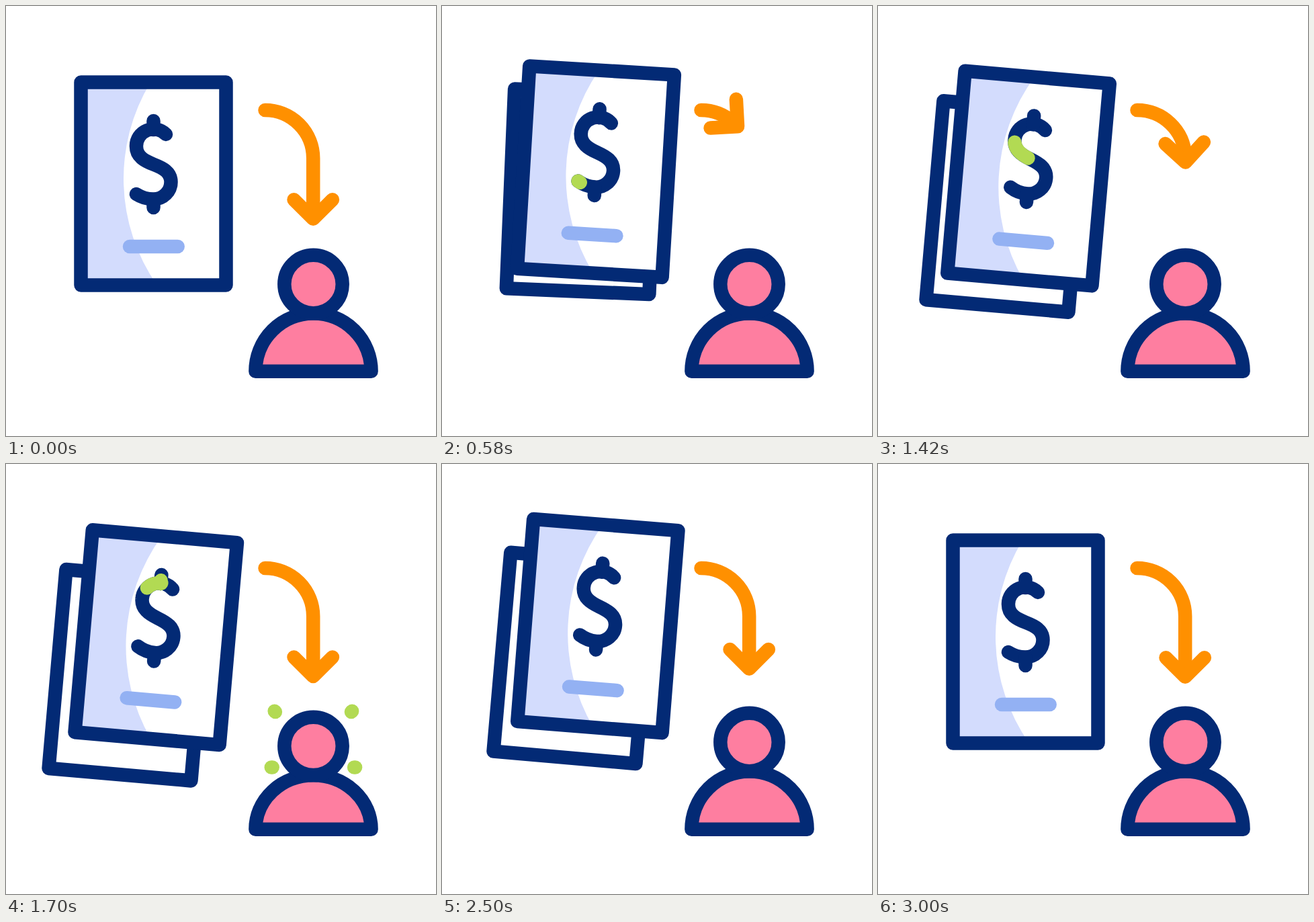
An HTML page for the animation above (3320 ms loop, 640x640 px).

```html
<!DOCTYPE html>
<html lang="en">
<head>
<meta charset="utf-8">
<title>Payment sent to a person</title>
<style>
  html, body { margin: 0; width: 100%; height: 100%; overflow: hidden; background: #fff; }
  svg { display: block; width: 100vw; height: 100vh; }
  .line { fill: none; stroke-width: 20.5; stroke-linecap: round; stroke-linejoin: round; }
  .navy { stroke: #032a75; }
  .white { fill: #fff; }
  .pink { fill: #fe7ea0; }
  .orange { stroke: #ff9000; }
  .blue { stroke: #93b1f3; }
  .green { stroke: #b2da53; }
</style>
</head>
<body>
<svg viewBox="0 0 640 640">
  <defs>
    <path id="ess" d="M194 280C201 284.500 210 287.500 219.500 287.500A26 25.500 0 0 0 245.500 262C245.500 247 233.400 241.100 219.700 235.800S194 224 194 209A25.500 25 0 0 1 238 191"/>
  </defs>

  <g id="back">
    <rect class="line navy white" x="-106.350" y="-148.500" width="212.700" height="297"/>
  </g>

  <g id="front">
    <g transform="translate(-219.500 -264.500)">
      <path class="white" d="M111.500 113.500h216v302h-216z"/>
      <path fill="#d3dcfd" d="M111.500 113.500H215.100A277 277 0 0 0 224.800 415.500H111.500z"/>
      <path class="line navy" d="M111.500 113.500h216v302h-216z"/>
      <path class="line blue" d="M184 358H255.700"/>
      <use href="#ess" class="line navy"/>
      <path class="line navy" d="M219.500 184V171M219.500 288V300"/>
      <path id="glow" class="line green" pathLength="1"/>
      <path id="lowTick" class="line green" pathLength="1" d="M219.500 288V300"/>
      <path id="topTick" class="line green" pathLength="1" d="M219.500 184V171"/>
    </g>
  </g>

  <g id="sparks"></g>

  <path id="body" class="line navy pink"/>
  <circle id="head" class="line navy pink" cx="457.500" r="43.200"/>

  <path id="shaft" class="line orange"/>
  <path id="tip" class="line orange" d="M-19.700 -28.700L9 0L-19.700 28.700" transform-origin="0 0"/>
</svg>

<script>
const LOOP = 3320;
const el = id => document.getElementById(id);
const set = (node, name, value) => node.setAttribute(name, value);

// Eased value at time t from a flat list: time, value, time, value...
function ease(t, keys) {
  if (t <= keys[0]) return keys[1];
  for (let i = 2; i < keys.length; i += 2) {
    if (t < keys[i]) {
      const s = (t - keys[i - 2]) / (keys[i] - keys[i - 2]);
      return keys[i - 1] + (keys[i + 1] - keys[i - 1]) * s * s * (3 - 2 * s);
    }
  }
  return keys[keys.length - 1];
}

// Shows only the stretch of a path its two moving ends enclose.
function trim(node, t, lead, tail) {
  const b = ease(t, [lead[0], 0, lead[1], 1]);
  const a = ease(t, [tail[0], 0, tail[1], 1]);
  node.style.display = b - a > 0.002 ? "" : "none";
  set(node, "stroke-dasharray", `${b - a} 3`);
  set(node, "stroke-dashoffset", -a);
}

set(el("glow"), "d", el("ess").getAttribute("d"));

const MID = 457.4;
const sparks = [];
for (const side of [-1, 1]) {
  for (const [dx, y, ex, ey] of [[56.1, 369.5, 23.5, -23.5], [60.1, 451.5, 37, 0]]) {
    const p = document.createElementNS("http://www.w3.org/2000/svg", "path");
    set(p, "class", "line green");
    set(p, "pathLength", 1);
    set(p, "d", `M${MID + side * dx} ${y}l${side * ex} ${ey}`);
    el("sparks").append(p);
    sparks.push(p);
  }
}

function card(node, x, y, lift, drop, toX, toY) {
  const px = x + toX * lift - 13.2 * drop;
  const py = y + toY * lift + 26 * drop;
  set(node, "transform", `translate(${px} ${py}) rotate(${5 * lift})`);
}

const R = 71.7, BEND = R * Math.PI / 2, X0 = 385.5, Y0 = 155;

function arrow(len) {
  const turn = Math.min(len, BEND) / R;
  const x = X0 + R * Math.sin(turn);
  const bendY = Y0 + R * (1 - Math.cos(turn));
  const y = bendY + Math.max(0, len - BEND);
  set(el("shaft"), "d", `M${X0} ${Y0}A${R} ${R} 0 0 1 ${x} ${bendY}V${y}`);
  set(el("tip"), "transform", `translate(${x} ${y}) rotate(${turn * 180 / Math.PI})`);
}

function draw(t) {
  card(el("front"), 219.5, 264.5,
    ease(t, [240, 0, 780, 1, 2400, 1, 2940, 0]),
    ease(t, [1170, 0, 1570, 1, 1970, 0]), 13.6, -25.8);
  card(el("back"), 220, 264.8,
    ease(t, [320, 0, 860, 1, 2480, 1, 3020, 0]),
    ease(t, [1255, 0, 1660, 1, 2065, 0]), -24.75, 24.2);

  trim(el("glow"), t, [454, 1992], [640, 2140]);
  trim(el("lowTick"), t, [800, 1000], [880, 1120]);
  trim(el("topTick"), t, [1620, 1820], [1710, 1950]);

  arrow(ease(t, [205, 193.8, 635, 46, 1240, 46, 1640, 193.8, 2045, 181.3, 2440, 181.3, 3000, 193.8]));

  const squash = ease(t, [1460, 0, 1640, 6, 2255, 0]);
  set(el("head"), "cy", 414 + squash);
  set(el("body"), "d", `M371.400 543.700A86.100 ${86.2 - squash} 0 0 1 543.600 543.700Z`);
  for (const p of sparks) trim(p, t, [1612, 2165], [1655, 2250]);
}

function tick(now) {
  draw(now % LOOP);
  requestAnimationFrame(tick);
}
draw(0);
requestAnimationFrame(tick);
</script>
</body>
</html>
```
